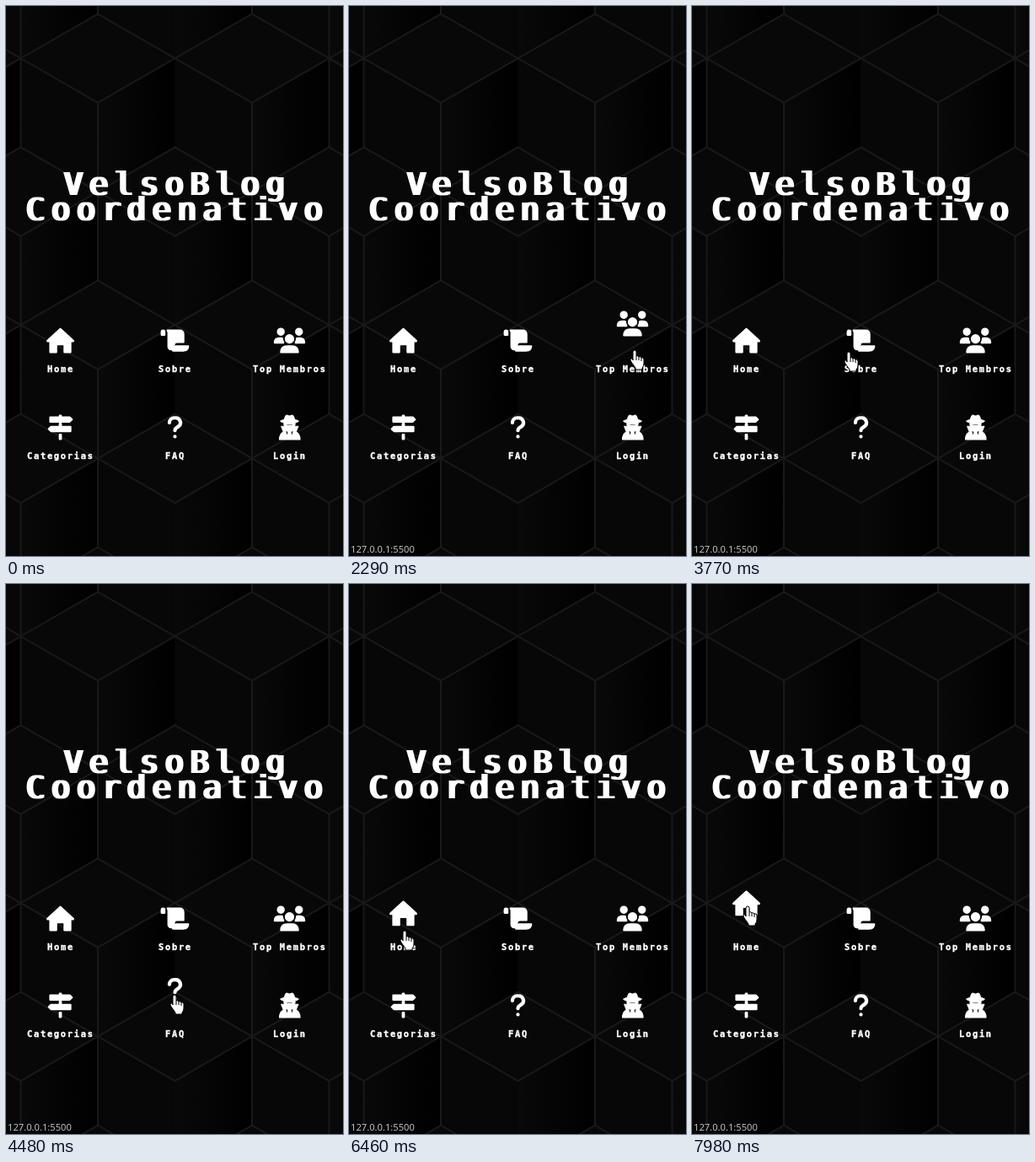
An HTML page for the animation above (8 s loop, 400x652 px).

```html
<!DOCTYPE html>
<html lang="pt">
<head>
<meta charset="utf-8">
<title>VelsoBlog Coordenativo</title>
<style>
  html, body { margin: 0; width: 100%; height: 100%; overflow: hidden; background: #080808; }
  svg { display: block; width: 100%; height: 100%; }
  text { fill: #fff; white-space: pre; }
  .title { font: 37px "DejaVu Sans Mono", monospace; letter-spacing: 7.72px; }
  .label { font: bold 10.4px "DejaVu Sans Mono", monospace; letter-spacing: 1.74px; stroke: #fff; stroke-width: .4; }
  .status { font: 11.2px "Open Sans", sans-serif; fill: #cdcdcd; }
  .icon { stroke: #fff; stroke-linejoin: round; stroke-linecap: round; }
  .edge { fill: none; stroke: #191919; stroke-width: 2; }
  .pointer { fill: #fff; stroke: #000; stroke-linejoin: round; }
</style>
</head>
<body>
<svg viewBox="0 0 400 652">
  <defs>
    <linearGradient id="shade">
      <stop offset="0" stop-color="#090909"/>
      <stop offset=".55" stop-color="#040404"/>
      <stop offset="1" stop-color="#000"/>
    </linearGradient>
    <filter id="widen" x="-5%" y="-20%" width="110%" height="140%">
      <feMorphology operator="dilate" radius="2 0"/>
    </filter>
  </defs>
  <rect width="400" height="652" fill="#080808"/>
  <g id="faces"></g>
  <g id="edges"></g>
  <g class="title" filter="url(#widen)">
    <text x="68.9" y="223.5">VelsoBlog</text>
    <text x="23.9" y="253.5">Coordenativo</text>
  </g>
  <g id="menu"></g>
  <text id="status" class="status" x="2" y="648">127.0.0.1:5500</text>
  <g id="cursor" class="pointer">
    <path id="arrow" d="M0 0v16l4-4 3 6 2-1-3-6h6z"/>
    <g id="hand">
      <path d="M-2 2q0-2 2-2t2 2v5q2-1 3 1 2-1 3 1 3-1 3 2v5q0 3-2 5v2h-8v-2l-5-7q-2-3 0-4t2 2z"/>
      <path fill="none" d="M2 7v5M5 8v4M8 9v4"/>
    </g>
  </g>
</svg>
<script>
const LOOP = 8000, BEAT = 400, RISE = 20, TRAVEL = 500;
const $ = id => document.getElementById(id);

function add(parent, tag, attrs, text) {
  const el = document.createElementNS("http://www.w3.org/2000/svg", tag);
  for (const k in attrs) el.setAttribute(k, attrs[k]);
  if (text) el.textContent = text;
  parent.appendChild(el);
  return el;
}

// Background: staggered rows of stacked cubes; the middle column has no upright edges
const A = 91.5, H = 52.7, MID = 200.5;
for (let row = -1; row < 5; row++) {
  for (let col = -2; col < 3; col++) {
    const x = MID + (2 * col - Math.abs(row % 2)) * A;
    const y = 62 + row * 3 * H;
    const transform = `translate(${x} ${y})`;
    const upright = dx => x + dx === MID ? "" : `M${dx} ${dx ? H : 0}v${2 * H}`;
    add($("faces"), "path", { transform, fill: "#070707", d: `M0 0l${A} ${H}v${2 * H}l${-A} ${-H}z` });
    add($("faces"), "path", { transform, fill: "url(#shade)", d: `M${A} ${H}l${A} ${-H}v${2 * H}l${-A} ${H}z` });
    add($("edges"), "path", { transform, class: "edge",
      d: `M0 0l${A} ${-H} ${A} ${H} ${-A} ${H}z` + upright(0) + upright(A) });
  }
}

// Icons on a 512-unit em; the round pen softens their corners
const disc = (x, y, r) => `M${x - r} ${y}a${r} ${r} 0 1 1 ${2 * r} 0a${r} ${r} 0 1 1 ${-2 * r} 0z`;
const post = (y, h) => `M244 ${y}h24v${h}h-24z`;

const icons = {
  house: { width: 576, d: "M288 22L548 262v6h-56v224H372V332H204v160H84V268H28v-6z" },
  scroll: { width: 576, d: "M20 84a28 28 0 0 1 56 0v56H20zM140 52h238q82 0 82 82v154H330q-62 0-62 62v30a56 56 0 0 1-112 0V90z" +
    "M308 372h248q-8 86-90 88H250q58-10 58-88z" },
  users: { width: 640, d: disc(144, 80, 60) + disc(512, 80, 60) + disc(320, 224, 76) +
    "M20 300q4-88 86-88h42l24 4q-4 48 24 84zM620 300q-4-88-86-88h-42l-24 4q4 48-24 84zM148 492q6-120 118-120h108q112 0 118 120z" },
  signs: { width: 512, d: "M52 52h392l44 44-44 44H52zM460 244v88H68l-44-44 44-44z" + post(20, 20) + post(180, 60) + post(404, 88) },
  question: { width: 320, pen: 72, fill: "none", d: "M48 160a96 96 0 0 1 96-96h32a96 96 0 0 1 51 177l-42 28q-25 16-25 50M160 442h0" },
  agent: { width: 448, pen: 20, d: "M224 26q20 0 44-14 36-10 60 86 78 20 78 30 0 18-70 30 6 50-16 76h80l-42 110q80 50 80 158H20" +
    "q0-108 80-158L58 234h70q-22-26-16-76-70-12-70-30 0-10 78-30 24-96 60-86 24 14 44 14z" +
    "M168 214h112l30-30v-4q-86 10-172 0v4zM182 330l-42-10 34 130 24-90zM266 330l-16 30 24 90 34-130z" }
};

const items = [
  ["Home", "house"], ["Sobre", "scroll"], ["Top Membros", "users"],
  ["Categorias", "signs"], ["FAQ", "question"], ["Login", "agent"]
].map(([label, name], i) => {
  const { width, d, pen = 40, fill = "#fff" } = icons[name];
  const center = 64 + 136 * (i % 3), top = 381.5 + 103 * Math.floor(i / 3), scale = 30 / 512;
  add($("menu"), "text", { class: "label", x: center - label.length * 4 + .9, y: top + 52.5 }, label);
  const icon = add($("menu"), "path", { class: "icon", d, fill, "stroke-width": pen });
  return { label, icon, x: center + .5 - width * scale / 2, center, top, scale };
});

// Each visit: the pointer rests at x, y while the icon hops a number of beats
const visits = [
  { label: "Login", at: 444, beats: 3, x: 342, y: 507 },
  { label: "Top Membros", at: 2090, beats: 1, x: 339, y: 408 },
  { label: "Sobre", at: 2944, beats: 2, x: 186, y: 410 },
  { label: "FAQ", at: 4308, beats: 1, x: 200, y: 487 },
  { label: "Categorias", at: 5250, beats: 2, x: 64, y: 493 },
  { label: "Home", at: 6386, beats: 2, x: 66, y: 411 },
  { label: "Home", at: 7820, beats: 1, x: 66, y: 382 }
];
const entry = { at: -BEAT, beats: 1, x: 366, y: 675 };

const smooth = p => p * p * (3 - 2 * p);
const end = v => v.at + v.beats * BEAT;

function lift(label, t) {
  const v = visits.find(v => v.label === label && t >= v.at && t < end(v));
  return v ? RISE * Math.sin(Math.PI * (t - v.at) / BEAT) ** 2 : 0;
}

function pointer(t) {
  const i = visits.findIndex(v => t < v.at);
  if (i < 0) return visits[visits.length - 1];
  const from = visits[i - 1] || entry, to = visits[i];
  const leave = Math.max(end(from), to.at - TRAVEL);
  const p = smooth(Math.max(0, (t - leave) / (to.at - leave)));
  return { x: from.x + (to.x - from.x) * p, y: from.y + (to.y - from.y) * p };
}

const overItem = (x, y) => items.some(m => Math.abs(x - m.center) < 40 && y >= m.top - 2 && y < m.top + 55);

function draw(t) {
  for (const { label, icon, x, top, scale } of items) {
    icon.setAttribute("transform", `translate(${x} ${top - lift(label, t)}) scale(${scale})`);
  }
  const { x, y } = pointer(t);
  const hand = overItem(x, y);
  $("cursor").setAttribute("transform", `translate(${x} ${y})`);
  $("hand").style.display = hand ? "" : "none";
  $("arrow").style.display = hand ? "none" : "";
  $("status").style.display = t < visits[0].at ? "none" : "";
}

const start = performance.now();
function tick() {
  draw((performance.now() - start) % LOOP);
  requestAnimationFrame(tick);
}
tick();
</script>
</body>
</html>
```
